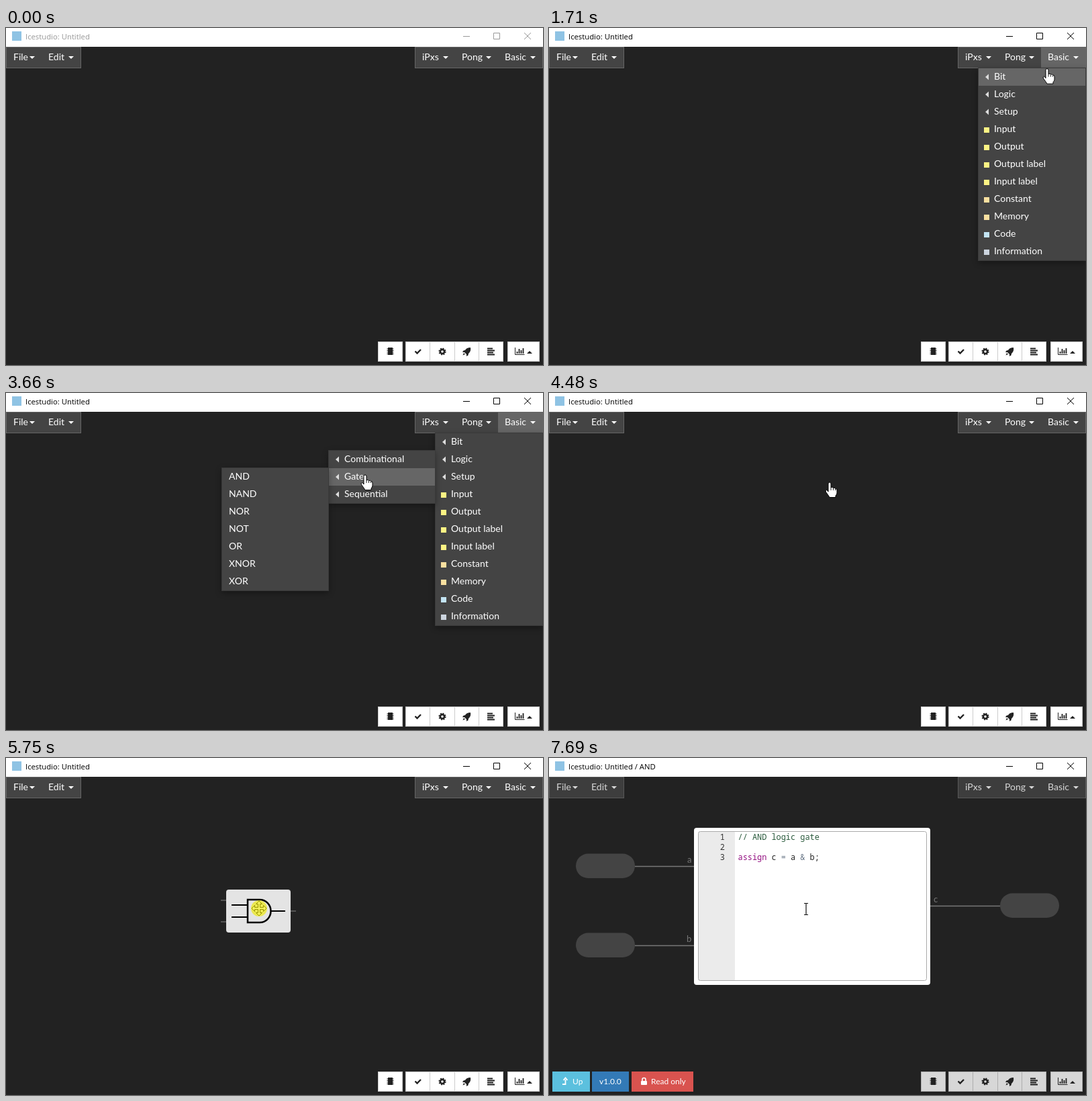
An HTML page that plays this animation: 800 by 502 pixels, repeating every 8 s.

```html
<!DOCTYPE html>
<html lang="en">
<head>
<meta charset="utf-8">
<title>Logic gate editor</title>
<style>
html, body { margin: 0; width: 100%; height: 100%; overflow: hidden; background: #222; }
svg { display: block; font: 14px Lato, sans-serif; fill: #fff; }
.title { font: 11.3px "Open Sans", sans-serif; }
.code { font: 11.9px "Noto Sans Mono", monospace; white-space: pre; }
.small { font-size: 12px; }
.panel { filter: drop-shadow(0 3px 4px #0005); }
.line { fill: none; }
</style>
</head>
<body>
<svg id="stage" width="800" height="502" viewBox="0 0 800 502"></svg>
<script>
const LOOP = 8000;
const ROW = 26;

const rect = (x, y, w, h, fill, more = '') =>
  `<rect x="${x}" y="${y}" width="${w}" height="${h}" fill="${fill}" ${more}/>`;
const text = (x, y, s, more = '') => `<text x="${x}" y="${y}" ${more}>${s}</text>`;
const path = (d, more = '') => `<path d="${d}" ${more}/>`;
const group = (id, body, more = '') => `<g id="${id}" ${more}>${body}</g>`;
const caret = x => path(`M${x} 42h8l-4 4z`);
const button = (x, w) => rect(x + .5, 467.5, w - 1, 29, '#fff', 'stroke="#ccc"');

// Menu panels; an item is a label, optionally with a marker colour or '<' for a submenu
const yellow = '#fcf384', cream = '#fae0a0';
const panels = [
  { id: 'basic', x: 640, y: 60, w: 159, from: 1330, items: [
    ['Bit', '<'], ['Logic', '<'], ['Setup', '<'], ['Input', yellow], ['Output', yellow],
    ['Output label', yellow], ['Input label', yellow], ['Constant', cream],
    ['Memory', cream], ['Code', '#c3e4f4'], ['Information', '#ccd4de']] },
  { id: 'logic', x: 481, y: 86, w: 158, from: 2080, items: [
    ['Combinational', '<'], ['Gate', '<'], ['Sequential', '<']] },
  { id: 'gates', x: 322, y: 112, w: 158, from: 3230, items:
    ['AND', 'NAND', 'NOR', 'NOT', 'OR', 'XNOR', 'XOR'].map(s => [s]) }
];
const MENU_END = 4480;

function panelMarkup({ id, x, y, w, items }) {
  const h = items.length * ROW;
  const rows = items.map(([label, mark], i) => {
    const cy = y + i * ROW + 13;
    const sign = mark === '<' ? path(`M${x + 15} ${cy - 4.5}v9l-5-4.5z`, 'fill="#ddd"')
      : mark ? rect(x + 8, cy - 3, 8, 8, mark) : '';
    return sign + text(x + (mark ? 23 : 10), cy + 4, label);
  }).join('');
  return group(id, rect(x - .5, y - .5, w + 1, h + 1, '#444', 'stroke="#3a3a3a" class="panel"')
    + rect(x, y, w, ROW, '#666', `id="${id}Hover"`) + rows);
}

const titleBar = rect(0, 0, 800, 28, '#fff') + rect(9, 5, 14, 14, '#8fc3e4')
  + group('caption', text(29, 17, 'Icestudio: Untitled', 'id="name" class="title"')
    + path('M681 12.5h10M726.5 7.5h9v9h-9zM772 7l10 10M782 7l-10 10', 'class="line" stroke="currentColor"'),
    'fill="currentColor"');

const menuBar = rect(.5, 28.5, 111, 31, '#444', 'stroke="#666"')
  + rect(609.5, 28.5, 190, 31, '#444', 'stroke="#666"')
  + rect(733, 28, 67, 32, '#666', 'id="basicTop"')
  + [['File', 11, 35], ['Edit', 63, 93], ['iPxs', 620, 651], ['Pong', 679, 715], ['Basic', 743, 781]]
    .map(([s, x, c]) => text(x, 48, s) + caret(c)).join('');

const toolBar = button(554, 37) + button(595, 146) + button(747, 48)
  + path('M631.5 468v28M668.5 468v28M704.5 468v28', 'stroke="#ccc"')
  + `<g fill="#222" stroke="#222" stroke-width="0">`
  + rect(569, 476, 7, 11, '#222')
  + path('M567.5 478h10M567.5 480.5h10M567.5 483h10M567.5 485.500h10', 'stroke-width="1.2"')
  + path('M609.5 481.500l3 3 5.500-5.500', 'class="line" stroke-width="2.4"')
  + '<circle cx="650" cy="482" r="3.1" class="line" stroke-width="2.6"/>'
  + '<circle cx="650" cy="482" r="4.700" class="line" stroke-width="1.8" stroke-dasharray="1.85"/>'
  + path('M692 476q-6 0-8 4l-2.500.5-1.500 2.500h3l3 3v3l2.500-1.500.5-2.500q4-3 3-9zM682 484l-1.500 3.500 3.500-1.500z')
  + path('M717 477.500h8M717 480.500h11M717 483.500h9M717 486.500h11', 'stroke-width="1.800"')
  + path('M758.500 476v10.500h14', 'class="line" stroke-width="1"')
  + path('M761.500 485v-3M764.500 485v-7M767.500 485v-5M770.500 485v-8', 'stroke-width="1.800"')
  + path('M776 485h8l-4-4z') + '</g>';

// Centred on its own origin
const block = rect(-48, -32, 96, 64, '#e4e4e4', 'rx="4"')
  + path('M-56-16h8M-56 16h8M48 0h8', 'stroke="#666" stroke-width="1.500"')
  + path('M-40-9h24M-40 9h24M18 0h22', 'stroke="#000" stroke-width="2"')
  + path('M-16-17H2a16.500 17 0 0 1 0 34H-16z', 'class="line" stroke="#000" stroke-width="2.500"');

const pill = (x, y) => rect(x, y, 88, 36.5, '#444', 'rx="18.250"');
const span = (s, color) => `<tspan fill="${color}">${s}</tspan>`;
const inner = pill(40, 142.5) + pill(40, 260.500) + pill(672, 201.500)
  + path('M128 161.500h88M128 279.500h88M568 220.500h104', 'stroke="#777" stroke-width="1.300"')
  + `<g fill="#777" style="font-size:13px">${text(206, 156, 'a') + text(205, 274, 'b') + text(573, 215, 'c')}</g>`
  + rect(216, 104, 352, 234, '#fff', 'rx="4"')
  + rect(222, 109, 55, 223, '#ebebeb', 'rx="3"')
  + rect(222.5, 109.5, 340, 222, 'none', 'rx="3" stroke="#aaa"')
  + '<g class="code" fill="#222">'
  + [1, 2, 3].map(n => text(262, 107 + n * 15, n, 'text-anchor="end" fill="#333"')).join('')
  + text(281.5, 122, '// AND logic gate', 'fill="#2a5a3c"')
  + text(281.5, 152, span('assign', '#930f80') + ' c ' + span('=', '#687687') + ' a ' + span('&amp;', '#687687') + ' b;')
  + '</g><g class="small">'
  + rect(5, 467, 56, 30, '#5bc0de') + rect(64, 467, 55, 30, '#337ab7') + rect(123, 467, 92, 30, '#d9534f')
  + path('M20 486h4.500v-7M21.500 480l3-3.500 3 3.500', 'class="line" stroke="#fff" stroke-width="1.800"')
  + rect(137, 481, 9, 6, '#fff', 'rx="1"')
  + path('M139 481v-2a2.500 2.500 0 0 1 5 0v2', 'class="line" stroke="#fff" stroke-width="1.600"')
  + text(35, 486, 'Up') + text(75, 486, 'v1.0.0') + text(152, 486, 'Read only') + '</g>';

const outline = 'stroke="#000" stroke-width="1" stroke-linejoin="round"';
const pointers = group('cross', path('M0-11L4.500-6.500H1.500V-1.500H6.500V-4.500L11 0L6.500 4.500V1.500H1.500V6.500H4.500L0 11L-4.500 6.500H-1.500V1.500H-6.500V4.500L-11 0L-6.500-4.500V-1.500H-1.500V-6.500H-4.500Z', outline))
  + '<circle id="press" r="12" fill="#f0eb00" fill-opacity=".64"/>'
  + group('hand', path('M-2 2Q-2 0 0 0T2 2V8Q4 6.500 5.500 8.500Q7.500 7.500 8.500 9.500Q11 9 11 12V16Q11 18 9 20V22.500H0Q-2 19 -5.500 14.500Q-6.500 11.500 -4.500 11.500Q-3 12 -2 14Z', outline)
    + path('M2 8v4M5.500 9v3M8.500 10v2', 'stroke="#222"'))
  + group('arrow', path('M0 0V17L4 13.200L6.600 19L9 18L6.500 12.300H12Z', outline))
  + group('beam', path('M-3-8.500h2.500q.5 0 .5.5.0-.5.5-.5H3M0-8V8M-3 8.500h2.500q.5 0 .5-.5.0.5.5.5H3', 'class="line" stroke="#111" stroke-width="1.200"'));

const stage = document.getElementById('stage');
stage.innerHTML = rect(0, 0, 800, 502, '#222') + titleBar
  + group('bars', menuBar + toolBar) + panels.map(panelMarkup).join('')
  + group('block', block) + group('inner', inner) + group('pointer', pointers);

const el = id => document.getElementById(id);
const show = (id, on) => { el(id).style.display = on ? '' : 'none'; };
const place = (id, x, y) => el(id).setAttribute('transform', `translate(${x} ${y})`);

// Pointer moves: first step, last step, number of steps, end point
const moves = [
  [430, 1150, 12, 768, 40],
  [1650, 1780, 3, 690, 102],
  [2390, 2460, 2, 610, 95],
  [2530, 3050, 8, 537, 120],
  [3660, 3660, 1, 535, 122],
  [3725, 3920, 4, 418, 133],
  [4800, 5310, 7, 394, 170],
  [5560, 5690, 3, 377, 224],
  [6500, 6720, 4, 488, 250],
  [6780, 6940, 4, 381, 224],
  [7640, 7640, 1, 383, 225]
];
const presses = [[1210, 1330], [4350, MENU_END], [5750, 5820], [7190, 7440]];
const DROP = 5690, OPEN = 7640;

function pointerAt(t) {
  let x = 640, y = 385;
  for (const [from, to, n, ex, ey] of moves) {
    if (t < from) break;
    const k = t >= to ? 1 : (1 + Math.floor((t - from) / (to - from) * (n - 1))) / n;
    x += (ex - x) * k;
    y += (ey - y) * k;
  }
  return [x, y];
}

function draw(t) {
  const [x, y] = pointerAt(t);
  const active = t >= 430, inside = t >= OPEN;
  const hasBlock = t >= 4550 && !inside;
  const menuOpen = t >= 1330 && t < MENU_END;
  const overBasic = active && t < MENU_END && y < 60 && x > 733;

  el('caption').style.color = active ? '#000' : '#999';
  el('name').textContent = 'Icestudio: Untitled' + (inside ? ' / AND' : '');
  el('bars').style.opacity = inside ? .82 : 1;
  show('basicTop', menuOpen || overBasic);

  for (const { id, x: px, y: py, w, from, items } of panels) {
    const row = Math.floor((y - py) / ROW);
    show(id, t >= from && t < MENU_END);
    show(id + 'Hover', x >= px && x < px + w && row >= 0 && row < items.length);
    el(id + 'Hover').setAttribute('y', py + row * ROW);
  }

  const [bx, by] = pointerAt(Math.min(t, DROP));
  show('block', hasBlock);
  place('block', Math.round(bx / 8) * 8, Math.floor(by / 8) * 8 + 4);
  show('inner', inside);

  const shape = inside ? 'beam'
    : hasBlock ? (x > 424 ? 'arrow' : 'cross')
    : t >= 1330 || overBasic ? 'hand' : 'arrow';
  for (const id of ['cross', 'hand', 'arrow', 'beam']) show(id, id === shape);
  show('press', presses.some(([a, b]) => t >= a && t < b));
  show('pointer', active);
  place('pointer', x, y);
}

const start = performance.now();
function tick() {
  draw((performance.now() - start) % LOOP);
  requestAnimationFrame(tick);
}
tick();
</script>
</body>
</html>
```
